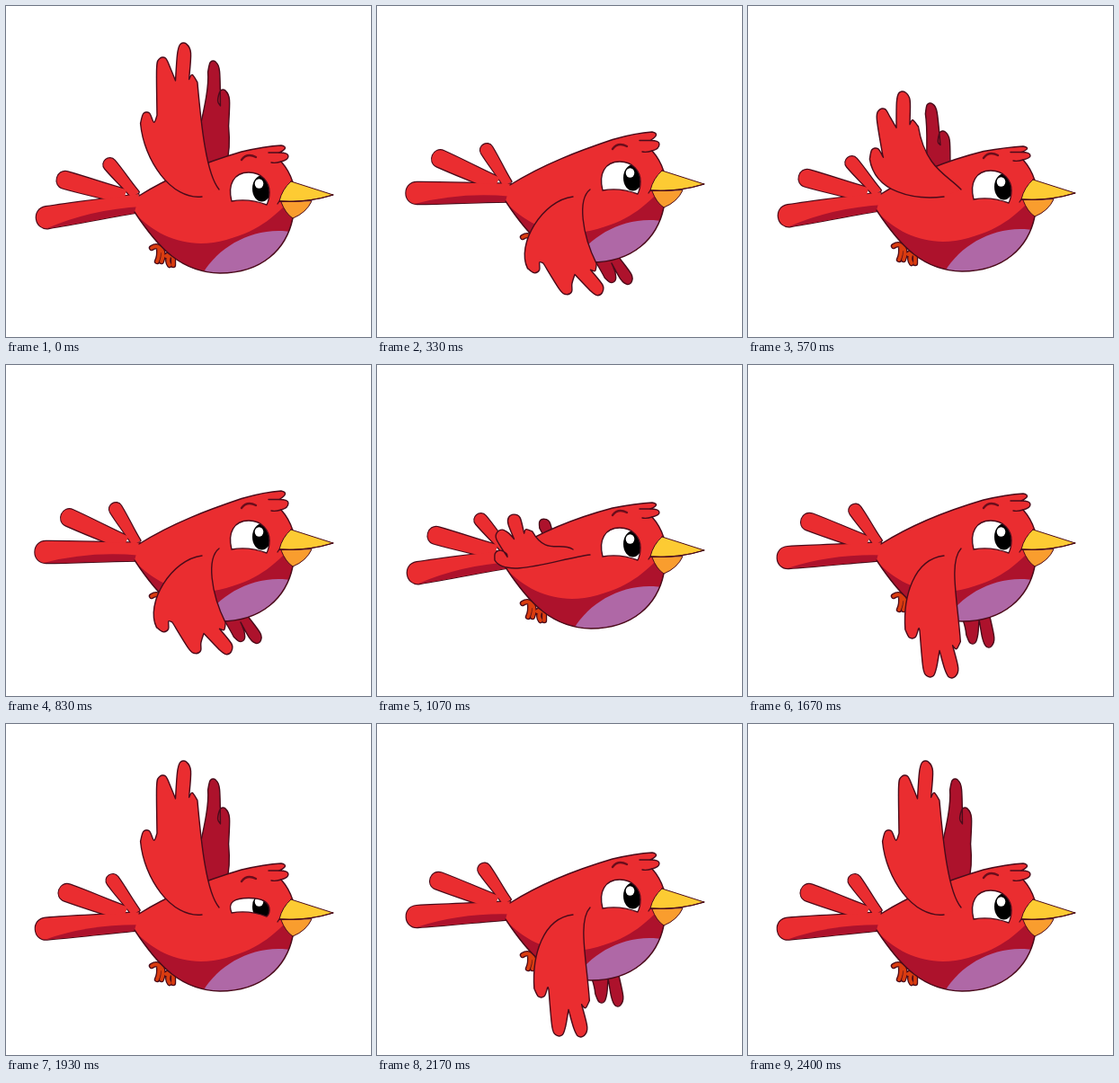
An HTML page with a canvas for the animation above (2.43 s loop, 406 by 368 pixels).

```html
<!DOCTYPE html>
<html lang="en">
<head>
<meta charset="utf-8">
<title>Flying bird</title>
<style>
html, body { margin: 0; width: 100%; height: 100%; overflow: hidden; background: #fff; }
canvas { display: block; }
</style>
</head>
<body>
<canvas id="stage" width="406" height="368"></canvas>
<script>
const ctx = document.getElementById('stage').getContext('2d');
const LOOP = 2430, FRAMES = 73, FLAPS = 5, POSES = 12;
const RED = '#ea2d30', DARK = '#ad122c', LINE = '#4a0b1a', PURPLE = '#af68a6';
const YELLOW = '#fdcb33', ORANGE = '#f99d2e', FOOT = '#d93c10', BROW = '#6b0d1b';

// A pose: wing root, feather tips, and the vector from a tip back to its notch.
const up = {
  root: [218, 212], tips: [[156, 118], [174, 57], [197, 41]], back: [3, 34],
  far: [[230, 61], [241, 93]], lift: 0, swing: 0, crest: 0
};
const half = {
  root: [218, 212], tips: [[141, 158], [149, 114], [171, 95]], back: [5, 31],
  far: [[202, 108], [216, 139]], lift: -2, swing: 0, crest: 3
};
const tuck = {
  root: [237, 211], tips: [[134, 207], [136, 184], [149, 167]], back: [10, 18],
  far: [[183, 172], [192, 184]], lift: -4, swing: 0, crest: 2
};
const down = {
  root: [218, 212], tips: [[183, 304], [203, 347], [227, 348]], back: [-2, -30],
  far: [[250, 310], [268, 314]], lift: -12, swing: .6, crest: 0
};
const low = {
  root: [218, 212], tips: [[178, 296], [214, 320], [248, 321]], back: [-11, -22],
  far: [[263, 307], [281, 309]], lift: -12, swing: 1, crest: -3
};
const keys = [
  [0, up], [1, half], [2, tuck], [5, down], [8, low],
  [10, { ...half, lift: -4, swing: .7, crest: 0 }], [11, { ...up, swing: .5 }]
];

function mix(a, b, t) {
  if (typeof a === 'number') return a + (b - a) * t;
  if (Array.isArray(a)) return a.map((v, i) => mix(v, b[i], t));
  return Object.fromEntries(Object.keys(a).map(k => [k, mix(a[k], b[k], t)]));
}

function poseAt(n) {
  const next = keys.findIndex(([at]) => at >= n);
  if (next === 0) return keys[0][1];
  const [from, a] = keys[next - 1], [to, b] = keys[next];
  return mix(a, b, (n - from) / (to - from));
}

const move = (p, v, k = 1) => [p[0] + v[0] * k, p[1] + v[1] * k];

// Adds a smooth curve through the points.
function through(path, pts) {
  for (let i = 0; i < pts.length - 1; i++) {
    const b = pts[i], c = pts[i + 1], a = pts[i - 1] || b, d = pts[i + 2] || c;
    path.bezierCurveTo(b[0] + (c[0] - a[0]) / 6, b[1] + (c[1] - a[1]) / 6,
      c[0] - (d[0] - b[0]) / 6, c[1] - (d[1] - b[1]) / 6, ...c);
  }
}

function wingPath(root, end, tips, back, width, bump) {
  const size = Math.hypot(...back) || 1, last = tips[tips.length - 1];
  let side = [back[1] / size, -back[0] / size];
  const fan = (last[0] - tips[0][0]) * side[0] + (last[1] - tips[0][1]) * side[1];
  if (fan < 0) side = side.map(v => -v);
  const at = (p, along, across) => move(move(p, back, along), side, across);

  const path = new Path2D();
  const first = at(tips[0], .35, -width);
  path.moveTo(...root);
  path.bezierCurveTo(root[0] - 34, root[1] + 4, ...move(first, back, 1.2), ...first);
  let from = first;
  tips.forEach((tip, i) => {
    const notch = tip === last ? at(tip, 1.2, 3) : move(mix(tip, tips[i + 1], .5), back);
    const cap = [at(tip, .35, -width), at(tip, .04, -width * .45), at(tip, .04, width * .45), at(tip, .35, width)];
    through(path, [...(i ? [from] : []), ...cap, notch]);
    from = notch;
  });
  if (bump) {
    const pts = [from, at(from, -.14, 4), at(from, .12, 9)];
    through(path, pts);
    from = pts[2];
  }
  path.bezierCurveTo(...move(from, back, 1.5), end[0] - 14, end[1] - back[1] / 2, ...end);
  return path;
}

// A rounded tail feather from base to tip.
function leaf(base, tip, baseHalf, tipHalf) {
  const span = [tip[0] - base[0], tip[1] - base[1]], size = Math.hypot(...span);
  const u = span.map(v => v / size), n = [-u[1], u[0]];
  const shoulder = move(tip, u, -tipHalf);
  const [b1, b2] = [1, -1].map(s => move(base, n, s * baseHalf));
  const [s1, s2] = [1, -1].map(s => move(shoulder, n, s * tipHalf));
  const path = new Path2D();
  path.moveTo(...b1);
  path.bezierCurveTo(...move(b1, u, size * .3), ...move(s1, u, -size * .3), ...s1);
  path.bezierCurveTo(...move(s1, u, tipHalf * 1.33), ...move(s2, u, tipHalf * 1.33), ...s2);
  path.bezierCurveTo(...move(s2, u, -size * .3), ...move(b2, u, size * .3), ...b2);
  return path;
}

const tail = [
  leaf([144, 210], [111, 171], 5, 7),
  leaf([132, 212], [57, 191], 8, 9.5),
  leaf([149, 219], [34, 237], 10, 12)
];
const tailShade = new Path2D('M46 247Q95 226 152 223V250H46Z');
const bodyShade = new Path2D('M142 229C168 258 205 271 245 260S300 232 320 212V310H130Z');
const belly = new Path2D('M219 297C238 265 280 243 322 252V310H219Z');
const beakTop = new Path2D('M317 195L364 210Q335 219 304 217Q307 204 317 195Z');
const beakLow = new Path2D('M306 218Q311 231 319 236Q334 230 340 217Z');
const mouth = new Path2D('M302 220L304 217Q335 219 364 210');
const brow = new Path2D('M262 171Q268 163 278 168');
const feet = new Path2D('M162 269Q168 265 172 270M170 269Q171 278 168 284M173 270Q176 276 173 284M178 278Q183 274 186 280V288M181 279Q179 284 182 288');

function flat(path, color) {
  ctx.fillStyle = color;
  ctx.fill(path);
}

function ink(path, width = 1.4, color = LINE) {
  ctx.lineWidth = width;
  ctx.strokeStyle = color;
  ctx.stroke(path);
}

function paint(path, fill, width) {
  flat(path, fill);
  ink(path, width);
}

function inside(path, draw) {
  ctx.save();
  ctx.clip(path);
  draw();
  ctx.restore();
}

function oval(x, y, rx, ry, color) {
  const path = new Path2D();
  path.ellipse(x, y, rx, ry, 0, 0, Math.PI * 2);
  flat(path, color);
}

function drawTail(swing) {
  ctx.save();
  ctx.translate(146, 218);
  ctx.rotate(swing * .15);
  ctx.translate(-146, -218);
  tail.forEach(feather => ink(feather, 2.4));
  tail.forEach(feather => flat(feather, RED));
  inside(tail[2], () => flat(tailShade, DARK));
  ctx.restore();
}

function drawBody(c) {
  const body = new Path2D(`M148 211C186 187 228 172 262 ${162 + c / 2}
    Q288 ${156 + c} 306 ${155 + c}Q316 ${157 + c} 304 ${163 + c / 2}
    Q314 ${163 + c / 2} 314 ${167 + c / 2}Q314 171 306 173Q315 183 319 196Q325 216 319 236
    C312 270 285 297 238 297C195 296 170 270 143 229`);
  flat(body, RED);
  inside(body, () => {
    flat(bodyShade, DARK);
    flat(belly, PURPLE);
  });
  ink(body);
  ink(new Path2D(`M304 ${163 + c / 2}L292 ${163 + c / 2}M306 173Q300 175 295 174`));
}

function drawFace(lid) {
  const top = 185 + 8.5 * lid, drop = 7 * lid;
  const eye = new Path2D(`M251 ${217 - drop}C246 198 254 ${top} 270 ${top}
    C285 ${top} 293 ${196 + lid * 2} 293 207Q293 ${215 - drop / 2} 290 ${221 - drop}
    Q270 ${213.5 - drop} 251 ${217 - drop}Z`);
  flat(eye, '#fff');
  inside(eye, () => {
    oval(284.5, 203, 10.5, 14.5, '#000');
    oval(281.5, 197.5, 4.8, 5.2, '#fff');
  });
  ink(eye);
  ctx.save();
  ctx.translate(0, Math.min(lid, 1) * 4);
  ink(brow, 2.4, BROW);
  ctx.restore();
  paint(beakLow, ORANGE, 1);
  paint(beakTop, YELLOW, 1);
  ink(mouth, 1.3);
}

function render(now) {
  const frame = Math.floor((now % LOOP) / (LOOP / FRAMES) + .15) % FRAMES;
  const pose = poseAt(Math.floor((frame * FLAPS / FRAMES % 1) * POSES));
  const lid = Math.max(0, 1.9 - Math.abs(frame - 59.5) * .6);
  const { root, tips, back, far } = pose;

  ctx.fillStyle = '#fff';
  ctx.fillRect(0, 0, 406, 368);
  ctx.lineJoin = ctx.lineCap = 'round';

  paint(wingPath([222, 200], [250, 190], far, back, 6.5), DARK);
  ctx.save();
  ctx.translate(0, pose.lift);
  ink(feet, 6.4);
  ink(feet, 3.8, FOOT);
  drawTail(pose.swing);
  drawBody(pose.crest);
  drawFace(lid);
  ctx.restore();
  paint(wingPath(root, [455 - root[0], 416 - root[1]], tips, back, 7.5, true), RED);
}

const start = performance.now();
function tick() {
  render(performance.now() - start);
  requestAnimationFrame(tick);
}
tick();
</script>
</body>
</html>
```
